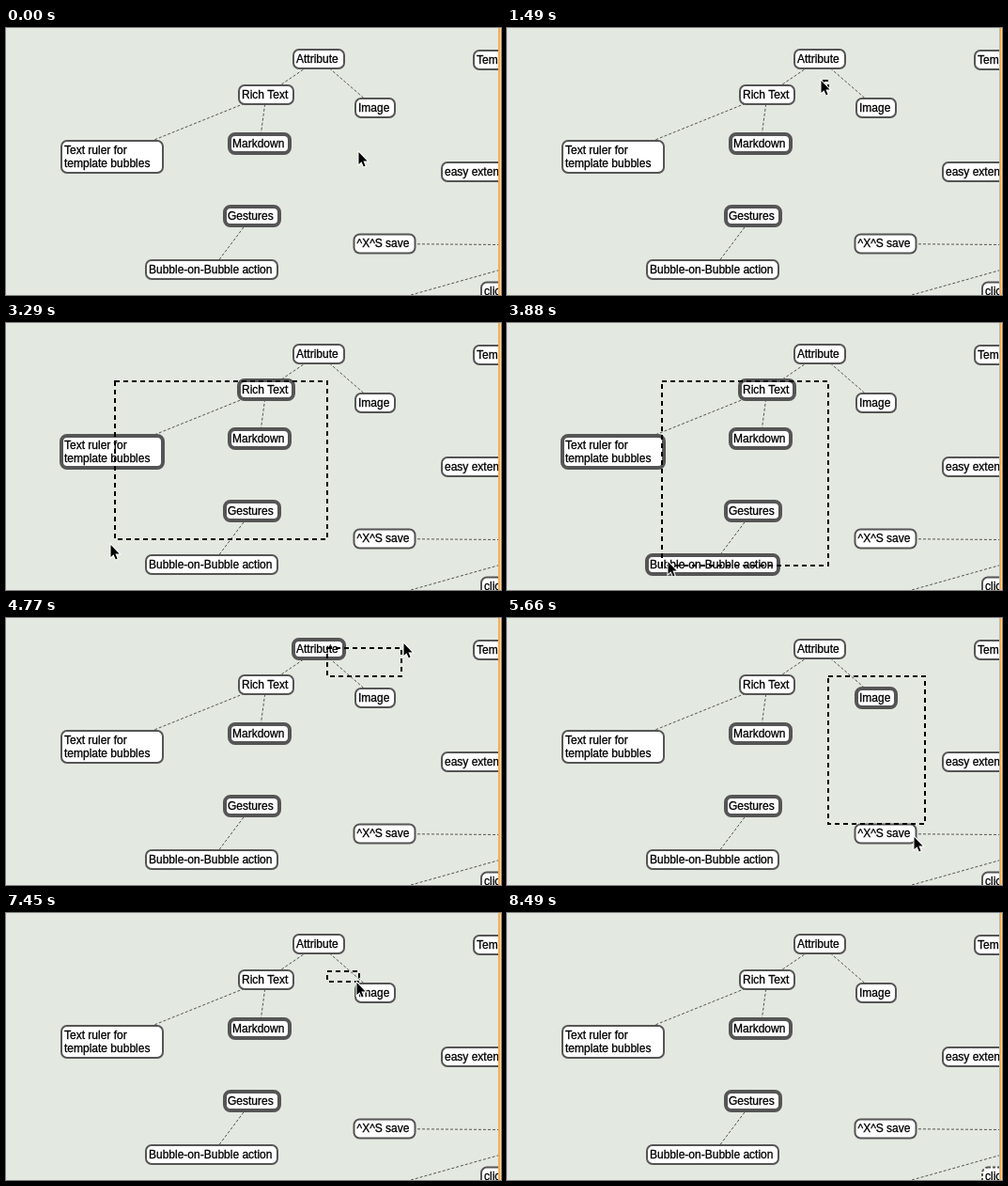
An HTML page with a canvas that plays this animation: 527 px wide and 284 px high, repeating every 9390 ms.

```html
<!DOCTYPE html>
<html lang="en">
<head>
<meta charset="utf-8">
<title>Selecting bubbles with a rubber band</title>
<style>
  html, body { margin: 0; height: 100%; overflow: hidden; background: #e3e8e0; }
  canvas { display: block; }
</style>
</head>
<body>
<canvas width="527" height="284"></canvas>
<script>
const ctx = document.querySelector('canvas').getContext('2d');
const LOOP = 9390, PRESS = 1490, RELEASE = 8050, LEAVE = 8490, STEP = 148.7;
const ANCHOR = { x: 342, y: 62 };
const LINE_HEIGHT = 14, WRAPPED_WIDTH = 108;
const INK = '#555';
const FONT = '12px "Liberation Sans", Arial, sans-serif';
ctx.font = FONT;

// A bubble grows with its text; wrapped text has a fixed width.
function bubble(x, y, text, pinned = false) {
  const lines = text.split('\n');
  const w = lines.length > 1 ? WRAPPED_WIDTH : Math.round(ctx.measureText(text).width + 9);
  return { x, y, w, h: 6 + lines.length * LINE_HEIGHT, lines, pinned };
}
const attribute = bubble(306, 23, 'Attribute');
const richText = bubble(248, 61, 'Rich Text');
const picture = bubble(372, 75, 'Image');
const markdown = bubble(238, 113, 'Markdown', true);
const ruler = bubble(59, 120, 'Text ruler for\ntemplate bubbles');
const gestures = bubble(233, 190, 'Gestures', true);
const action = bubble(149, 247, 'Bubble-on-Bubble action');
const save = bubble(370.5, 219.5, '^X^S save');
const templates = bubble(498, 24, 'Templates');
const extend = bubble(464, 143, 'easy extend');
const click = bubble(506, 270.5, 'click');
const bubbles = [attribute, richText, picture, markdown, ruler, gestures,
  action, save, templates, extend, click];

// Links join centres; the last two lead outside the view.
const outside = (x, y) => ({ x, y, w: 0, h: 0 });
const links = [
  [attribute, richText], [attribute, picture], [richText, ruler],
  [richText, markdown], [gestures, action],
  [save, outside(527, 230.5)], [outside(431, 284), outside(527, 257)],
];

// Turning points of the pointer: step counted from the press, x, y.
const keys = [
  [-9, 375, 131], [-4, 340, 62], [-1, 340, 62],
  [3, 282, 18], [5, 250, 42], [12, 111, 235], [14, 108, 290],
  [19, 340, 140], [22, 423, 26], [24, 480, 10], [26, 512, 100],
  [32, 105, 430], [33, 97, 253], [37, 172, 32], [39, 376, 75],
  [44, 345, 60], [45, 345, 60], [46, 425, 165],
];

// Tangent along one axis, flat wherever the direction turns or rests.
function slope(i, axis) {
  const before = keys[i - 1], here = keys[i], after = keys[i + 1];
  if (!before || !after) return 0;
  const turns = (here[axis] - before[axis]) * (after[axis] - here[axis]) <= 0;
  return turns ? 0 : (after[axis] - before[axis]) / (after[0] - before[0]);
}

function pointerAt(step) {
  const first = keys[0][0], last = keys[keys.length - 1][0];
  const s = Math.min(Math.max(step, first), last);
  const i = Math.max(1, keys.findIndex(key => key[0] >= s));
  const a = keys[i - 1], b = keys[i], span = b[0] - a[0];
  const u = (s - a[0]) / span, v = 1 - u;
  const along = axis => Math.round(
    v * v * (1 + 2 * u) * a[axis] + u * u * (1 + 2 * v) * b[axis] +
    span * u * v * (v * slope(i - 1, axis) - u * slope(i, axis)));
  return { x: along(1), y: along(2) };
}

// The band trails the pointer slightly.
function bandAt(step) {
  const now = pointerAt(step), before = pointerAt(step - 1), lag = 0.18;
  const x = Math.round(now.x + 2 + lag * (before.x - now.x));
  const y = Math.round(now.y + lag * (before.y - now.y));
  return {
    x: Math.min(x, ANCHOR.x), y: Math.min(y, ANCHOR.y),
    w: Math.abs(x - ANCHOR.x), h: Math.abs(y - ANCHOR.y),
  };
}

const overlaps = (a, b) =>
  a.x < b.x + b.w && a.x + a.w > b.x && a.y < b.y + b.h && a.y + a.h > b.y;

function drawLinks() {
  ctx.strokeStyle = INK;
  ctx.lineWidth = 1;
  ctx.setLineDash([3, 2]);
  for (const [a, b] of links) {
    ctx.beginPath();
    ctx.moveTo(a.x + a.w / 2, a.y + a.h / 2);
    ctx.lineTo(b.x + b.w / 2, b.y + b.h / 2);
    ctx.stroke();
  }
}

function drawText(text, x, y) {
  ctx.font = FONT;
  ctx.fillStyle = ctx.strokeStyle = '#000';
  ctx.lineWidth = 0.3;
  ctx.setLineDash([]);
  ctx.fillText(text, x, y);
  ctx.strokeText(text, x, y);
}

function drawBubble(b, selected, hovered) {
  ctx.beginPath();
  ctx.roundRect(b.x, b.y, b.w, b.h, 6);
  ctx.fillStyle = '#fff';
  ctx.fill();
  ctx.strokeStyle = INK;
  ctx.lineWidth = selected ? 4 : 2;
  ctx.setLineDash(hovered ? [3, 2] : []);
  ctx.stroke();
  b.lines.forEach((line, i) =>
    drawText(line, b.x + 3, Math.floor(b.y + (i + 1) * LINE_HEIGHT)));
}

function drawBand(band) {
  ctx.strokeStyle = '#000';
  ctx.lineWidth = 2;
  ctx.setLineDash([5, 4]);
  ctx.strokeRect(band.x, band.y, band.w, band.h);
}

const arrow = new Path2D('M.5 1V14L3.5 11.2L5.8 16.4L7.6 15.6L5.4 10.4H9.6Z');
function drawPointer({ x, y }) {
  ctx.save();
  ctx.translate(x, y);
  ctx.setLineDash([]);
  ctx.strokeStyle = '#fff';
  ctx.lineWidth = 2;
  ctx.stroke(arrow);
  ctx.fillStyle = '#000';
  ctx.fill(arrow);
  ctx.restore();
}

function drawWindowEdge() {
  ctx.fillStyle = '#f5ad55';
  ctx.fillRect(524, 0, 2, 284);
  ctx.fillStyle = '#f8d9b0';
  ctx.fillRect(526, 0, 1, 284);
}

function render() {
  const time = performance.now() % LOOP;
  const step = Math.floor((time - PRESS) / STEP);
  const band = time >= PRESS && time < RELEASE ? bandAt(step) : null;
  const gone = time >= LEAVE;

  ctx.fillStyle = '#e3e8e0';
  ctx.fillRect(0, 0, 527, 284);
  drawLinks();
  for (const b of bubbles) {
    drawBubble(b, b.pinned || (band && overlaps(b, band)), gone && b === click);
  }
  drawWindowEdge();
  if (band) drawBand(band);
  if (!gone) drawPointer(pointerAt(step));
  requestAnimationFrame(render);
}
render();
</script>
</body>
</html>
```
